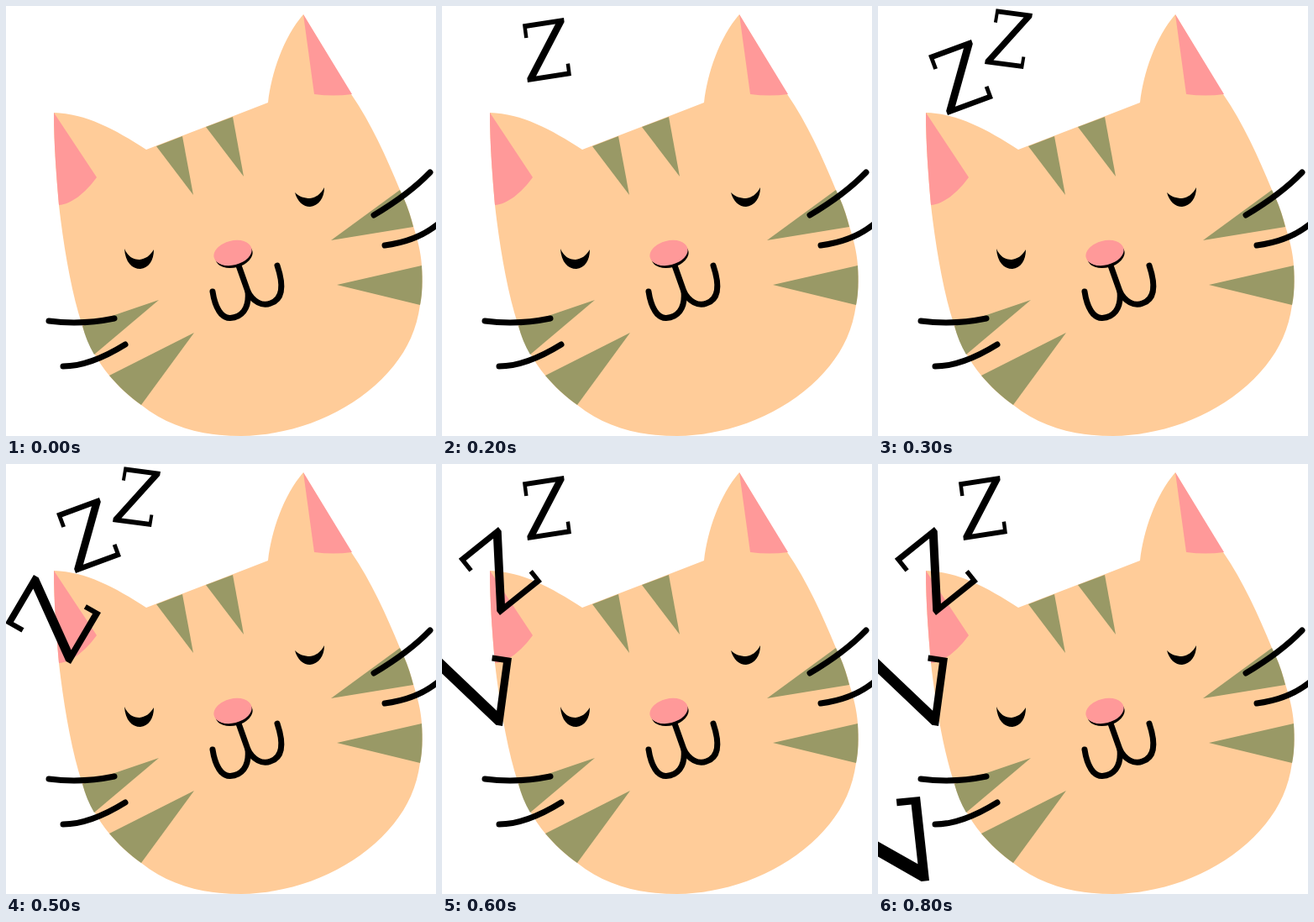
An HTML page that plays this animation: 512x512 px, repeating every 0.9 s.

```html
<!DOCTYPE html>
<html lang="en">
<head>
<meta charset="utf-8">
<title>Sleeping cat</title>
<style>
  html, body { margin: 0; width: 100%; height: 100%; overflow: hidden; background: #fff; }
  svg { display: block; width: 100%; height: 100%; }
</style>
</head>
<body>
<svg id="stage" viewBox="0 0 512 512">
  <path fill="#fc9" d="M57 127C95 128 130 147 167 171L312 115C316 80 330 38 354 10L411 105C435 140 453 180 469 219C476 233 481 247 485 262C490 278 494 293 495 309C496 325 496 342 493 356C489 385 478 408 462 428C420 480 350 511 280 512C235 512 195 502 161 475C147 465 134 453 123 440C109 423 97 402 90 378C78 340 69 290 63 237C60 202 57 165 57 127Z"/>
  <g fill="#f99">
    <path d="M57 127L108 204C95 222 78 236 63 237C60 202 57 165 57 127Z"/>
    <path d="M354 10L412 105Q390 108 367 105Z"/>
  </g>
  <g fill="#996">
    <path d="M179 167L210 155L223 225Z"/>
    <path d="M238 144L270 132L283 203Z"/>
    <path d="M387 279L469 219C476 233 481 247 485 263Z"/>
    <path d="M394 332L495 309C496 325 496 342 493 356Z"/>
    <path d="M182 350L91 381Q96 400 105 415Z"/>
    <path d="M224 389L123 440C134 453 147 465 161 475Z"/>
  </g>
  <path d="M141 289C142 305 150 313 160 313C170 312 176 303 176 290C171 298 166 301 159 302C151 302 145 298 141 289Z"/>
  <path d="M344 222C347 233 354 239 362 239C372 238 379 229 379 216C375 224 369 228 362 229C355 229 349 227 344 222Z"/>
  <g fill="none" stroke="#000" stroke-width="7" stroke-linecap="round" stroke-linejoin="round">
    <path d="M277 309L288 340C290 361 280 371 267 371.500C257 372 249 360 246 340"/>
    <path d="M288 340C294 352 305 358 315 354C330 349 331 333 323 309"/>
    <path d="M51 375Q90 380 129 372"/>
    <path d="M68 429Q100 429 142 403"/>
    <path d="M438 249Q480 224 505 198"/>
    <path d="M451 285Q490 280 515 259"/>
  </g>
  <ellipse cx="271.500" cy="297" rx="22.500" ry="14.500" transform="rotate(-14 271.500 297)"/>
  <ellipse cx="270" cy="294" rx="23" ry="14.500" fill="#f99" transform="rotate(-14 270 294)"/>
  <g id="snores"></g>
</svg>
<script>
const STEP = 100, STEPS = 9;
const Z_WIDTH = 53, Z_HEIGHT = 70;
const Z_PATH = 'M3-70H53V-65L11-6H48.500V-15H53V0H0V-5L42-64H7.500V-53H3Z';

// Stops along the drift: bottom-left, bottom-right and top-right corner of the letter
const STOPS = [
  [127, 69, 173, 75, 184, 9],
  [102, 91, 154, 83, 145, 14],
  [83, 130, 137, 110, 111, 40],
  [69, 180, 119, 140, 67, 75],
  [77, 238, 113, 177, 33, 132],
  [72, 312, 83, 231, -24, 215],
  [62, 404, 74, 307, -53, 289],
  [61, 496, 50, 396, -82, 409]
];

function addLetter([lx, ly, rx, ry, tx, ty]) {
  const z = document.createElementNS('http://www.w3.org/2000/svg', 'path');
  const m = [
    (rx - lx) / Z_WIDTH, (ry - ly) / Z_WIDTH,
    (rx - tx) / Z_HEIGHT, (ry - ty) / Z_HEIGHT,
    lx, ly
  ];
  z.setAttribute('d', Z_PATH);
  z.setAttribute('transform', `matrix(${m})`);
  document.getElementById('snores').append(z);
  return z;
}

const letters = STOPS.map(addLetter);

// A new letter sets off on every second step; each moves one stop per step
function draw(time) {
  const head = Math.floor(time / STEP) % STEPS - 1;
  letters.forEach((z, i) => {
    const shown = i <= head && (head - i) % 2 === 0;
    z.setAttribute('visibility', shown ? 'visible' : 'hidden');
  });
}

const start = performance.now();
function tick() {
  draw(performance.now() - start);
  requestAnimationFrame(tick);
}
draw(0);
requestAnimationFrame(tick);
</script>
</body>
</html>
```
